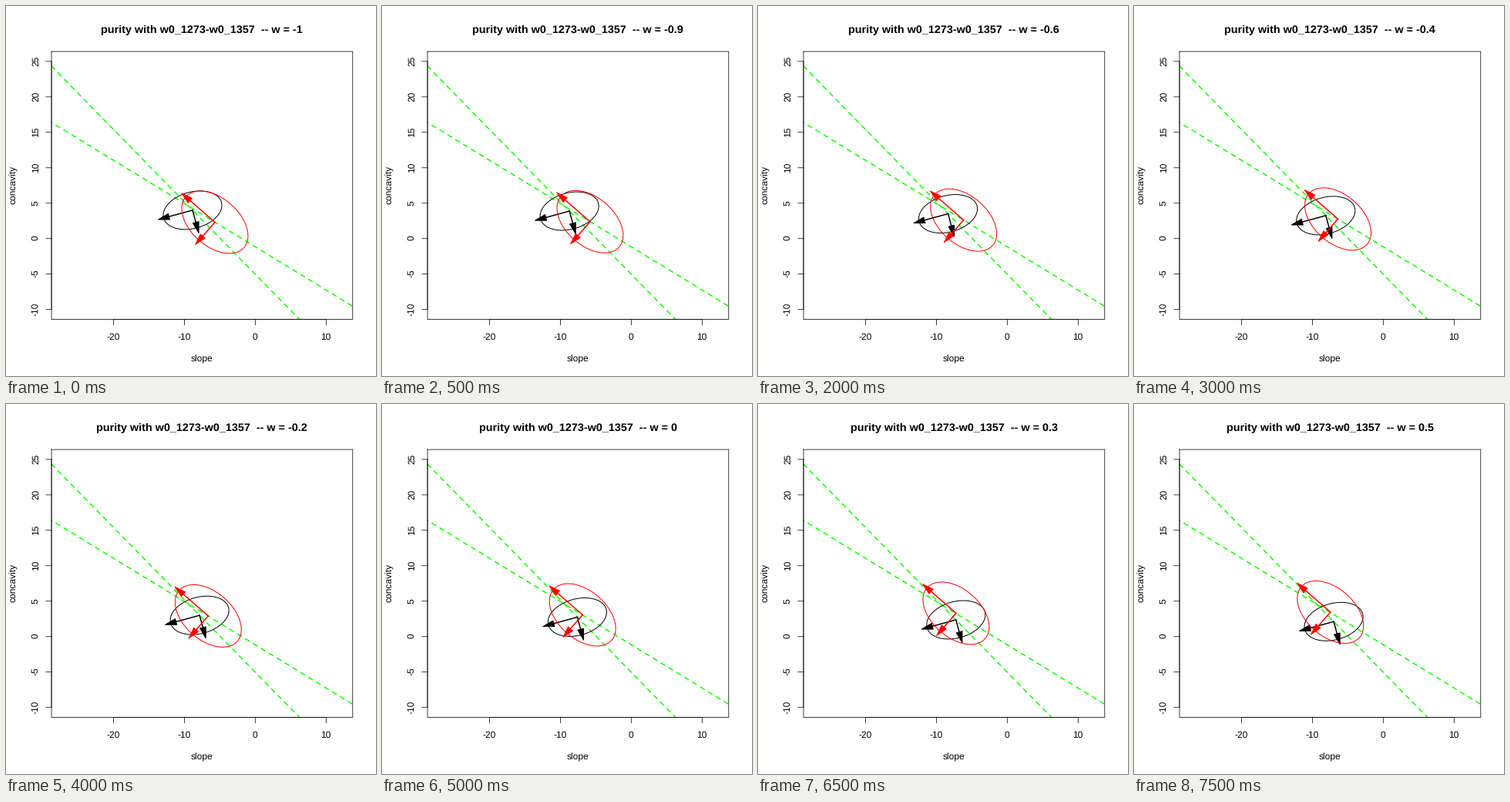
A matplotlib script for the animation above (8000 ms loop, 480 by 480 pixels).

```python
import numpy as np
import matplotlib.pyplot as plt
from matplotlib.animation import FuncAnimation

plt.rcParams["font.family"] = "Liberation Sans"
plt.rcParams["text.hinting"] = "none"

SIZE, DPI = 480, 100
PX = 72 / DPI                      # points per pixel
LEFT, RIGHT, TOP, BOTTOM = 59.04, 449.76, 59.04, 406.56
SCALE, X0, Y0 = 9.194, 323.35, 301.75  # pixels per unit, position of zero
MID_X, MID_Y = (LEFT + RIGHT) / 2, (TOP + BOTTOM) / 2
TICK = 7.2
GREEN = "#14ff00"
STEPS = 16

fig = plt.figure(figsize=(SIZE / DPI, SIZE / DPI), dpi=DPI, facecolor="white")
ax = fig.add_axes([0, 0, 1, 1])
ax.set_xlim(0, SIZE)
ax.set_ylim(SIZE, 0)
ax.axis("off")


def line(xs, ys, color="black", width=0.75, **kw):
    return ax.plot(xs, ys, color=color, lw=width * PX, snap=False, **kw)[0]


def label(x, y, text, size=12, **kw):
    return ax.text(x, y, text, fontsize=size * PX, ha="center", va="baseline",
                   rotation_mode="anchor", **kw)


def draw_axes():
    line([LEFT, RIGHT, RIGHT, LEFT, LEFT], [TOP, TOP, BOTTOM, BOTTOM, TOP])
    xs, ys = range(-20, 11, 10), range(-10, 26, 5)
    line([X0 + SCALE * xs[0], X0 + SCALE * xs[-1]], [BOTTOM, BOTTOM])
    line([LEFT, LEFT], [Y0 - SCALE * ys[0], Y0 - SCALE * ys[-1]])
    for v in xs:
        x = X0 + SCALE * v
        line([x, x], [BOTTOM, BOTTOM + TICK])
        label(x - 0.6, 432.7, str(v))
    for v in ys:
        y = Y0 - SCALE * v
        line([LEFT - TICK, LEFT], [y, y])
        label(41.8, y - 0.6, str(v), rotation=90)
    label(MID_X, 461.7, "slope")
    label(13, MID_Y - 0.6, "concavity", rotation=90)


def draw_guides():
    for xs, ys, phase in (((LEFT, 380.7), (78, BOTTOM), 0),
                          ((LEFT, RIGHT), (151, 389.5), 3.5)):
        line(xs, ys, GREEN, 1.5, linestyle=(phase, (4, 4)),
             dash_capstyle="round", zorder=1)


# Arrow head pointing along +x, centred on the end of its shaft
HEAD = np.array([[7.3, 0], [-7.3, 4], [-7.3, -4]])


class Cloud:
    """Ellipse with an arrow along each of its half axes."""

    def __init__(self, color, center, step, direction, axes, zorder):
        self.center, self.step = np.array(center), np.array(step)
        u = np.array(direction) / np.hypot(*direction)
        v = np.array([u[1], -u[0]])
        t = np.linspace(0, 2 * np.pi, 181)[:, None]
        outline = axes[0] * np.cos(t) * u + axes[1] * np.sin(t) * v
        self.parts = [(line([], [], color, 1, zorder=zorder), outline)]
        for d, reach in ((u, axes[0]), (v, axes[1])):
            shaft = np.array([[0, 0], d * reach])
            normal = np.array([-d[1], d[0]])
            head = d * reach + HEAD[:, :1] * d + HEAD[:, 1:] * normal
            self.parts.append((line([], [], color, 1.5, zorder=zorder), shaft))
            patch = ax.fill(head[:, 0], head[:, 1], fc=color, ec=color,
                            lw=0.9 * PX, joinstyle="round", snap=False,
                            zorder=zorder)[0]
            self.parts.append((patch, head))

    def place(self, i):
        for artist, points in self.parts:
            moved = points + self.center + i * self.step
            if hasattr(artist, "set_xy"):
                artist.set_xy(moved)
            else:
                artist.set_data(moved[:, 0], moved[:, 1])


draw_axes()
draw_guides()
title = label(MID_X - 0.4, 35, "", size=14.4, weight="bold")
clouds = [
    Cloud("black", (242, 264.9), (1.14, 1.16), (-0.965, 0.263),
          (38.9, 23.6), 3),
    Cloud("red", (271, 280.5), (-1.08, -0.7), (-0.754, -0.657),
          (50.1, 31.2), 4),
]


def update(i):
    w = (i - 10) / 10
    title.set_text(f"purity with w0_1273-w0_1357  -- w = {w:g}")
    for cloud in clouds:
        cloud.place(i)
    return []


anim = FuncAnimation(fig, update, frames=STEPS, interval=500,
                     repeat=True, repeat_delay=0, blit=False)
plt.show()
```
